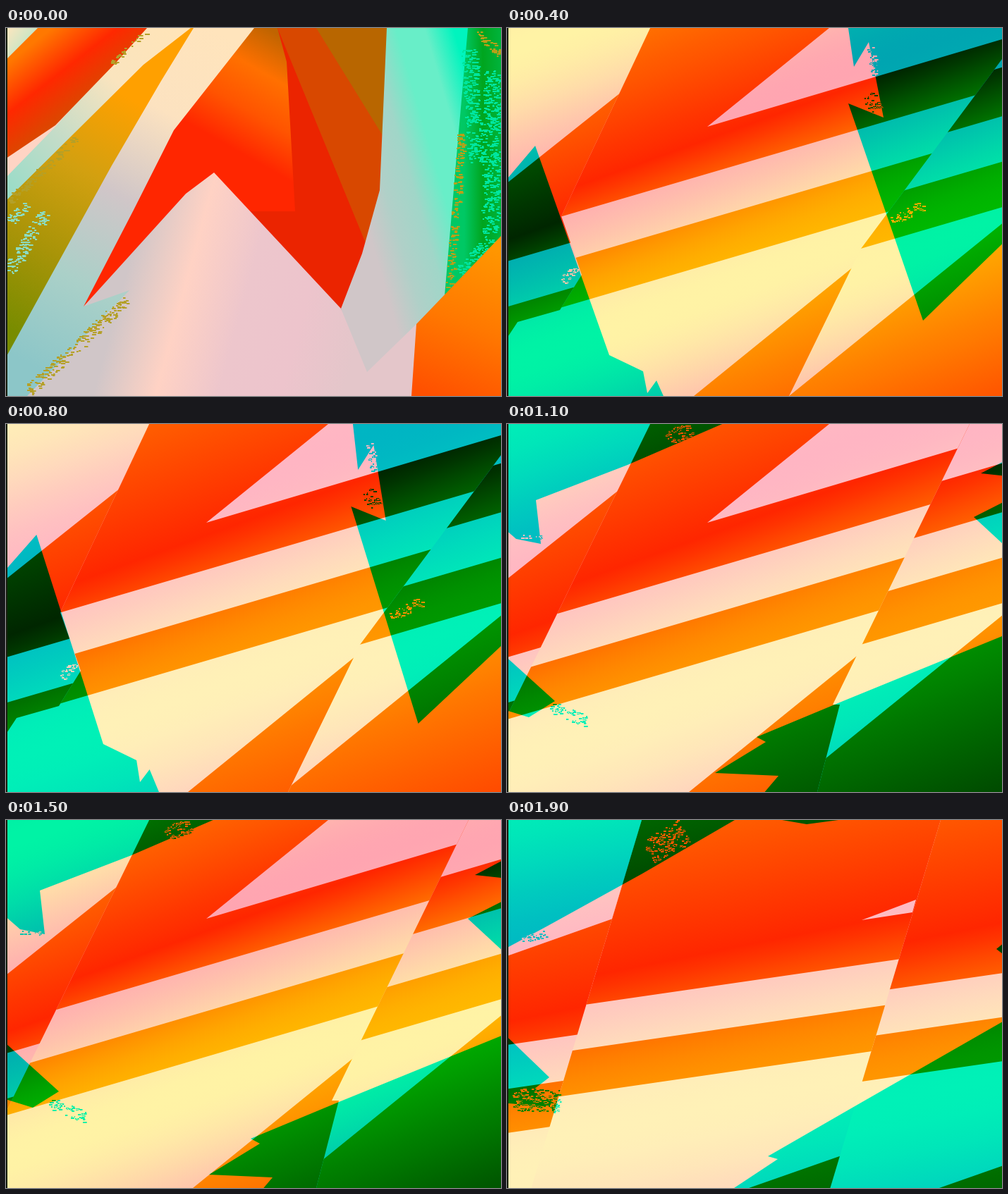
Recreate the animation shown at these times as an HTML page with a canvas. Size 702 by 522 pixels, loop 2000 ms.

```html
<!DOCTYPE html>
<html lang="en">
<head>
<meta charset="utf-8">
<title>Shifting bands</title>
<style>
html, body { margin: 0; width: 100%; height: 100%; overflow: hidden; background: #182010; }
canvas { display: block; }
</style>
</head>
<body>
<canvas id="stage" width="702" height="522"></canvas>
<script>
const W = 702, H = 522, LOOP = 2000, STEP = 100, OFFSET = 41, OUT = 20;
const ctx = document.getElementById('stage').getContext('2d');
const mix = (a, b, t) => a + (b - a) * t;
const clamp = t => Math.max(0, Math.min(1, t));

function random(seed) {
  return () => {
    seed = (seed * 1664525 + 1013904223) >>> 0;
    return seed / 4294967296;
  };
}

function outline(...polys) {
  const path = new Path2D();
  for (const pts of polys) {
    path.moveTo(pts[0], pts[1]);
    for (let i = 2; i < pts.length; i += 2) path.lineTo(pts[i], pts[i + 1]);
    path.closePath();
  }
  return path;
}

function fill(style, pts) {
  ctx.fillStyle = style;
  ctx.fill(outline(pts));
}

// Broken flecks scattered along a strip.
function flecks(path, [x1, y1, x2, y2, width]) {
  const len = Math.hypot(x2 - x1, y2 - y1);
  const rnd = random(Math.round(x1 * 31 + y2 * 7));
  for (let n = len * width / 16; n > 0; n--) {
    const t = rnd(), d = (rnd() - .5) * width / len;
    path.rect(Math.round(mix(x1, x2, t) - d * (y2 - y1)),
              Math.round(mix(y1, y2, t) + d * (x2 - x1)), 2 + rnd() * 4, 2);
  }
}

// Colour waves along the gradient axis; soft fades between two palettes.
function paleColor(v, soft) {
  const wave = Math.cos(2 * Math.PI * (v - mix(235, 200, soft)) / mix(490, 560, soft));
  return `rgb(255,${mix(204, 211, soft) - mix(39, 30, soft) * wave},${mix(171, 189, soft) + 6 * wave})`;
}

function hotColor(v, soft) {
  const d = v - 262, rise = 213;
  const level = d < 0 ? -.39 * d
    : d < rise ? 148 * Math.sin(Math.PI / 2 * d / rise)
    : 148 - .39 * (d - rise);
  return `rgb(255,${37 + Math.max(0, level) * mix(1, .78, soft)},0)`;
}

function ramp(color, slope, offset, soft) {
  const from = -60, to = 780, count = 42, n = 1 + slope * slope;
  const a = (from + offset) / n, b = (to + offset) / n;
  const g = ctx.createLinearGradient(slope * a, a, slope * b, b);
  for (let i = 0; i <= count; i++) g.addColorStop(i / count, color(mix(from, to, i / count), soft));
  return g;
}

const WIDE = {
  tilt: .293, first: 290, gap: 64.5, lean: .49, left: 203, right: 656,
  rise: .81, floors: [265, 400], slope: .36, shift: 0,
  wedges: {
    left: [-OUT, 236, 157, 95, 274, 0, -OUT, 0],
    center: [457, 0, 284, 140, W + OUT, 10, W + OUT, 0],
    right: [0, 262, W + OUT, 50, W + OUT, -OUT, 0, -OUT]
  }
};
const FLAT = {
  tilt: .145, first: 278, gap: 62.5, lean: .3, left: 191, right: 615,
  rise: .35, floors: [350, 620], slope: .2, shift: -15,
  wedges: { left: [-OUT, 200, 150, 140, 540, 0, -OUT, 0], center: [503, 142, 580, 113, 575, 131] }
};

const slant = (scene, x) => [x, 0, x - scene.lean * H, H];
const leftOf = pts => [-OUT, 0, ...pts, -OUT, H];
const rightOf = pts => [...pts, W + OUT, H, W + OUT, 0];

function stripe({ tilt, first, gap }, from, to, offset) {
  const at = (x, n) => [x, first + n * gap + offset - tilt * x];
  return [...at(-OUT, from), ...at(W + OUT, from), ...at(W + OUT, to), ...at(-OUT, to)];
}

function drawPart(scene, side, offset, soft, edge, floorX) {
  const { slope, shift, rise, wedges } = scene;
  const pale = ramp(paleColor, slope, shift + offset, soft);
  const hot = ramp(hotColor, slope, shift + offset, soft);
  const end = W + OUT;
  ctx.save();
  if (edge) ctx.clip(outline(edge));
  ctx.fillStyle = pale;
  ctx.fillRect(0, 0, W, H);
  fill(hot, stripe(scene, -10, 0, offset));
  fill(hot, stripe(scene, 1, 2, offset));
  if (wedges[side]) fill(pale, wedges[side]);
  if (floorX) fill(hot, [floorX, H, end, H - (end - floorX) * rise, end, H]);
  ctx.restore();
}

function drawBands(scene, pose, soft, t = 0) {
  const [near, far] = scene.floors.map(x => x - 7 * soft);
  drawPart(scene, 'center', 0, soft, null, near);
  drawPart(scene, 'left', OFFSET, soft, leftOf(pose.left || slant(scene, scene.left)));
  drawPart(scene, 'right', OFFSET, soft, rightOf(pose.right || slant(scene, scene.right)), far);

  // Cool areas lose their red; overlaps switch it back on.
  const path = outline(...pose.cool.map(pts => drift(pts, pose.drift, t)));
  pose.noise.forEach(strip => flecks(path, strip));
  ctx.globalCompositeOperation = 'multiply';
  ctx.fillStyle = '#0ff';
  ctx.fill(path, 'evenodd');
  ctx.globalCompositeOperation = 'source-over';
}

// Both sides of the stage move in opposite directions while leaning over.
function drift(pts, { dx = 0, dy = 0, lean = 0 } = {}, t) {
  const side = pts[0] < W / 2 ? -t : t;
  return pts.map((n, i) => i % 2 ? n + dy * side : n + dx * side - lean * t * (pts[i + 1] - H / 2));
}

const STEEP = {
  drift: { dy: 10, lean: .035 },
  left: [203, 0, 77, 267, 106, 350, 75, 400, 15, 417, -OUT, 470],
  right: [735, 0, 502, 313, 400, H],
  cool: [
    [-OUT, 238, 40, 167, 145, 464, 193, 487, 199, 518, 212, 500, 230, 540, -OUT, 540],
    [481, -OUT, 492, 55, 513, 20, 534, 127, 484, 107, 590, 415, 722, 287, 722, -OUT]
  ],
  noise: [[514, 22, 520, 66, 9], [510, 95, 526, 118, 18], [545, 275, 590, 250, 14], [78, 360, 98, 342, 14]]
};

const SLANT = {
  drift: { dx: 7, dy: -8 },
  right: [656, 0, 462, 398, 472, 398, 440, H],
  cool: [
    [-OUT, -OUT, 340, -OUT, 178, 50, 48, 100, 55, 162, 20, 155, -OUT, 120],
    [722, 298, 472, 400, 347, 452, 360, 459, 288, 503, 378, 507, 350, 540, 722, 540],
    [-OUT, 299, 75, 385, 38, 408, -OUT, 390],
    [722, 48, 665, 78, 722, 84], [722, 106, 655, 140, 722, 202]
  ],
  noise: [[225, 18, 262, 6, 22], [62, 400, 112, 422, 16], [20, 159, 50, 161, 6]]
};

const CURVED = {
  left: [197, 0, 92, 265, 92, 390, 45, 408, 0, 480],
  right: [735, 0, 508, 311, 428, 500, 415, H],
  cool: [
    [-OUT, 45, 137, 11, 92, 265, 88, 310, 105, 400, 120, 440, 115, 452, 70, 477, 55, H, -OUT, H],
    [668, 0, 652, 50, 612, 72, 610, 180, 556, 252, 549, 185, 527, 320, 489, 515, 722, 466, 722, 0],
    [558, 405, 577, 375, 562, 488]
  ],
  noise: [[628, 15, 600, 110, 16], [578, 30, 572, 120, 10], [575, 115, 568, 245, 32],
          [538, 285, 582, 252, 14], [615, 150, 655, 98, 10]]
};

const LEVEL = {
  cool: [
    [-OUT, 192, 58, 150, 192, 76, 323, 0, -OUT, 0],
    [722, 275, 495, 405, 370, 477, 384, 481, 322, H, 722, H],
    [-OUT, 288, 60, 365, 38, 382, 76, 408, -OUT, 400],
    [390, 0, 425, 6, 470, 0], [694, 183, 722, 160, 722, 205]
  ],
  noise: [[198, 45, 250, 15, 36], [20, 172, 55, 160, 10], [8, 396, 75, 398, 32]]
};

function fade(x1, y1, x2, y2, ...colors) {
  const g = ctx.createLinearGradient(x1, y1, x2, y2);
  colors.forEach((c, i) => g.addColorStop(i / (colors.length - 1), c));
  return g;
}

function scatter(color, ...strips) {
  const path = new Path2D();
  strips.forEach(strip => flecks(path, strip));
  ctx.fillStyle = color;
  ctx.fill(path);
}

// Each layer is bounded by one edge and covers everything beyond it.
function drawShards() {
  const corner = (style, ...pts) => fill(style, [0, 0, ...pts]);
  const left = (style, ...pts) => fill(style, leftOf(pts));
  const right = (style, ...pts) => fill(style, rightOf(pts));
  const below = (style, ...pts) => fill(style, [...pts, W, H, 0, H]);
  const peak = (style, ...pts) => fill(style, pts);

  ctx.fillStyle = '#eb2400';
  ctx.fillRect(0, 0, W, H);
  left(fade(370, 0, 285, 150, '#c06400', '#ff7000', '#ff5400', '#ff2600'), 385, 0, 398, 48, 410, 260, 300, 260);
  peak(fade(295, 210, 400, 180, '#ff5a00', '#ff2800', '#eb2400'), [285, 205, 330, 150, 410, 180, 440, 365]);
  right('#d84800', 385, 0, 512, 310);
  right('#b86600', 440, 0, 545, 170);
  peak('#ecc4ca', [398, 47, 367, 142, 348, 123, 322, 141]);

  right(fade(500, 380, 726, 314, '#d0c6c8', '#d0c6c8', '#b0d0c8', '#a0d6c8', '#68eec8', '#68eec8', '#00f4be'),
        540, 0, 530, 230, 505, 320, 475, 398, 505, H);
  right(fade(650, 0, W, 0, '#00c864', '#00a51e', '#00b43c'), 655, 0, 640, 170, 622, 380);
  peak('#788e08', [650, 172, 672, 208, 672, 272, 638, 330]);
  peak('#9be4c4', [655, 0, W, 0, W, 45]);
  scatter('#00e6a0', [656, 30, 666, 190, 22], [690, 60, 686, 290, 25], [645, 350, 692, 300, 28]);
  scatter('#b8a018', [645, 150, 628, 370, 10], [665, 5, 700, 35, 12]);

  below(fade(170, 350, 500, 440, '#d0c6c8', '#ffd2c4', '#edc6cc', '#edc4cc', '#e4c6ca'),
        110, 395, 255, 235, 295, 205, 475, 398, 512, 488, 582, 420);
  corner(fade(290, 0, 40, 480, '#ffe4bc', '#fce2c0', '#d0c6c8', '#aad0c8', '#8cc6c8'),
         352, 0, 238, 145, 180, 260, 110, 395, 175, 372, 30, H, 0, H);
  peak(fade(60, 510, 430, 520, '#aa7000', '#be6c00', '#ff8c00', '#ff6e00', '#ff5a00'),
       [25, H, 253, 283, 303, 355, 350, 415, 450, H]);
  peak(fade(80, 500, 250, 430, '#64f0c8', '#96e6c8', '#d2f2c4', '#d4f2c0'), [48, H, 228, 355, 300, 455, 340, H]);
  below(fade(680, 310, 600, 520, '#ff9600', '#ff7800', '#ff5000'), 575, H, 582, 420, W, 295);
  peak(fade(640, 510, W, 450, '#f0c4cc', '#ffb4b8'), [632, H, 655, 475, W, 420, W, H]);

  corner(fade(250, 0, 10, 430, '#ffa000', '#ffa000', '#d2a010', '#a89408', '#788c00'),
         266, 0, 220, 75, 150, 195, 0, 467);
  corner(fade(0, 240, 240, 0, '#96dcc8', '#c4dcc8', '#fae4be', '#ffe4b8'), 262, 0, 195, 52, 0, 245);
  corner('#ffd4c4', 150, 50, 70, 140, 0, 212);
  corner(fade(40, 20, 110, 110, '#ff7800', '#ff2800', '#d84a00'), 200, 0, 155, 50, 70, 138, 0, 185);
  peak(fade(0, 140, 130, 0, '#ffc8c8', '#d2c4c8', '#b4ccc8'), [130, 0, 10, 140, 80, 92, 150, 45, 196, 0]);
  corner(fade(0, 0, 40, 30, '#ffe6be', '#b4e6c8'), 45, 0, 0, 45);
  scatter('#b4a028', [4, 245, 100, 155, 12], [150, 50, 195, 5, 8], [30, 515, 170, 385, 16]);
  scatter('#8cdcc0', [3, 345, 55, 260, 18], [4, 275, 28, 250, 16]);
}

function draw(step) {
  const toSoft = (step - 4) / 4, toSharp = (15 - step) / 4;
  if (step < 2) drawShards();
  else if (step < 10) drawBands(WIDE, STEEP, clamp(toSoft), toSoft);
  else if (step < 16) drawBands(WIDE, SLANT, clamp(toSharp), toSharp);
  else if (step < 18) drawBands(WIDE, CURVED, 0);
  else drawBands(FLAT, LEVEL, 1);
  ctx.fillStyle = '#182010';
  ctx.fillRect(0, 0, 2, H);
}

const start = performance.now();
let shown = -1;
function tick() {
  const step = Math.floor((performance.now() - start) % LOOP / STEP);
  if (step !== shown) draw(shown = step);
  requestAnimationFrame(tick);
}
tick();
</script>
</body>
</html>
```
